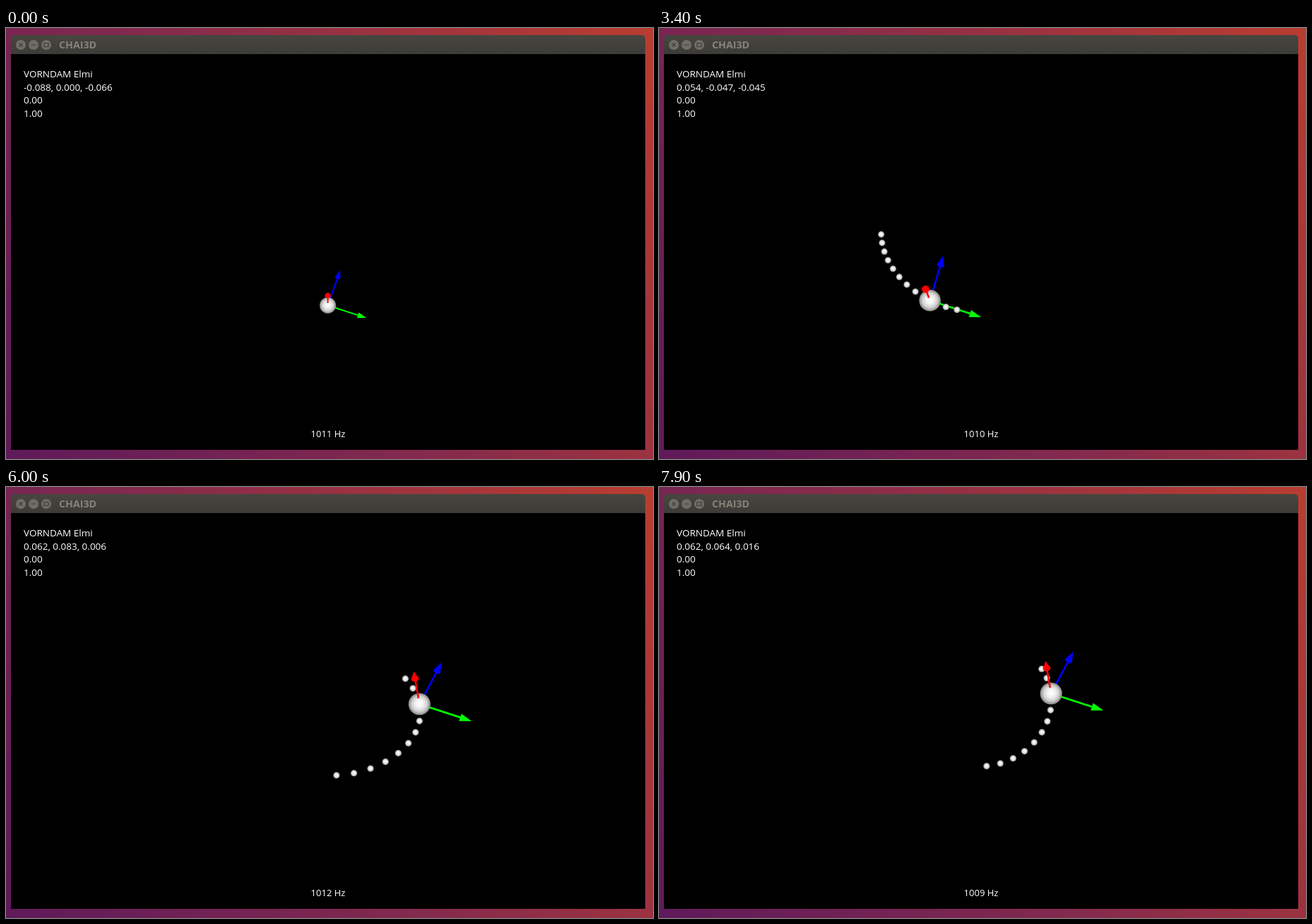
Write an HTML page with a canvas that moves like this. It is 916 by 611 pixels and loops after 8000 ms.

```html
<!DOCTYPE html>
<html lang="en">
<head>
<meta charset="utf-8">
<title>CHAI3D</title>
<style>
  html, body { margin: 0; width: 100%; height: 100%; overflow: hidden; background: #000; }
  canvas { display: block; }
</style>
</head>
<body>
<canvas id="stage" width="916" height="611"></canvas>
<script>
const ctx = document.getElementById('stage').getContext('2d');
const LOOP = 8000, FRAME = 100;
const CENTER = { x: 455.5, y: 317.3 };
const REST = { x: 455.6, y: 393.2, depth: -0.088 };
const RISE_START = 1100, RISE_END = 2350, ORBIT_START = 2250;
const SPHERE_RADIUS = 0.01, DOT_RADIUS = 0.003, AXIS_LENGTH = 0.0485;
const TRAIL_COUNT = 12, TRAIL_STEP = 50, TRAIL_LEAD = 125;
const RATES = [1011, 1013, 1010, 1010, 1008, 1011, 1012, 1009]; // one reading per second

const cos = degrees => Math.cos(degrees * Math.PI / 180);
const sin = degrees => Math.sin(degrees * Math.PI / 180);
const mix = (a, b, u) => a + (b - a) * u;

function smoothstep(from, to, t) {
  const u = Math.min(1, Math.max(0, (t - from) / (to - from)));
  return u * u * (3 - 2 * u);
}

// Anticlockwise loop: slower at first, then one lap per 1.9 s, with a slowly swaying reach
function orbit(t) {
  const angle = (t - 4085) * 360 / 1900 + Math.max(0, 3700 - t) * 0.057;
  const sway = cos((t - 2700) * 360 / 3300);
  return {
    x: 447 + (1.07 + 0.14 * sway) * (112 * cos(angle - 3.4) + 9 * cos(2 * angle + 69)),
    y: 296 + 8 * sway - 97.6 * sin(angle - 11.3) - 10.6 * cos(2 * angle),
    depth: 0.0565 + 0.0055 * cos(angle)
  };
}

// The hand rests, rises, then circles
function handAt(t) {
  const rise = smoothstep(RISE_START, RISE_END, t);
  const goal = orbit(Math.max(t, ORBIT_START));
  const depth = mix(REST.depth, goal.depth, rise ** 0.7);
  return {
    x: mix(REST.x, goal.x, rise ** 3),
    y: mix(REST.y, goal.y, rise),
    depth, rise,
    scale: 660 / (0.486 - depth)
  };
}

function disc(x, y, r, fill) {
  ctx.fillStyle = fill;
  ctx.beginPath();
  ctx.arc(x, y, r, 0, 2 * Math.PI);
  ctx.fill();
}

function ball({ x, y, scale }, size) {
  const r = size * scale;
  const shade = ctx.createRadialGradient(x, y - r * 0.08, 0, x, y, r);
  shade.addColorStop(0, '#fff');
  shade.addColorStop(0.35, '#f3f3f3');
  shade.addColorStop(0.7, '#cfcfcf');
  shade.addColorStop(1, '#858585');
  disc(x, y, r, shade);
}

function arrow({ x, y, scale }, dx, dy, color, start = 0) {
  const length = Math.hypot(dx, dy), half = 0.0035 * scale, base = length * 0.78;
  const tilt = Math.sqrt(Math.max(0, 1 - (length / (AXIS_LENGTH * scale)) ** 2));
  ctx.save();
  ctx.translate(x, y);
  ctx.rotate(Math.atan2(dy, dx));
  ctx.strokeStyle = ctx.fillStyle = color;
  ctx.lineWidth = 0.0017 * scale;
  ctx.beginPath();
  ctx.moveTo(length * start, 0);
  ctx.lineTo(base, 0);
  ctx.stroke();
  ctx.beginPath();
  ctx.moveTo(length, 0);
  ctx.lineTo(base, half);
  ctx.lineTo(base, -half);
  ctx.fill();
  ctx.beginPath();
  ctx.ellipse(base, 0, half * tilt, half, 0, 0, 2 * Math.PI);
  ctx.fill();
  ctx.restore();
}

function text(string, x, y, { font = '13.5px', color = '#fff', align = 'left' } = {}) {
  ctx.font = `${font} "Open Sans", sans-serif`;
  ctx.fillStyle = color;
  ctx.textAlign = align;
  ctx.fillText(string, x, y);
}

function drawWindow() {
  const desktop = ctx.createLinearGradient(0, 611, 916, 0);
  desktop.addColorStop(0, '#5f1a5a');
  desktop.addColorStop(0.45, '#842a4d');
  desktop.addColorStop(1, '#b93d30');
  ctx.fillStyle = desktop;
  ctx.fillRect(0, 0, 916, 611);

  const bar = ctx.createLinearGradient(0, 10, 0, 37);
  bar.addColorStop(0, '#484640');
  bar.addColorStop(1, '#3c3b37');
  ctx.fillStyle = bar;
  ctx.beginPath();
  ctx.roundRect(7, 10, 898, 588, [5, 5, 0, 0]);
  ctx.fill();
  ctx.fillStyle = '#000';
  ctx.fillRect(7, 37, 898, 561);

  for (const x of [21, 39, 57]) disc(x, 24, 7, '#6f6d66');
  ctx.strokeStyle = '#3c3b37';
  ctx.lineWidth = 1.2;
  ctx.beginPath();
  ctx.moveTo(18.5, 21.5); ctx.lineTo(23.5, 26.5);
  ctx.moveTo(23.5, 21.5); ctx.lineTo(18.5, 26.5);
  ctx.moveTo(35.5, 24); ctx.lineTo(42.5, 24);
  ctx.rect(54, 21.5, 6, 5);
  ctx.stroke();
  text('CHAI3D', 75, 29, { font: 'bold 14.2px', color: '#858279' });
}

function drawScene(t) {
  const hand = handAt(t), { scale } = hand;
  const drop = Math.max(0, hand.y - CENTER.y); // a lowered hand tilts the axes
  const trail = Array.from({ length: TRAIL_COUNT },
    (_, k) => handAt(t + TRAIL_LEAD - k * TRAIL_STEP)).sort((a, b) => a.depth - b.depth);
  const inFront = dot => {
    const offset = Math.hypot(dot.x - hand.x, dot.y - hand.y) / scale;
    return dot.depth - hand.depth > Math.sqrt(Math.max(0, SPHERE_RADIUS ** 2 - offset ** 2));
  };

  for (const dot of trail) if (!inFront(dot)) ball(dot, DOT_RADIUS);
  arrow(hand, 31.5 - 0.18 * drop, -0.038 * scale - 0.08 * drop, '#00f');
  arrow(hand, 0.0475 * scale, 0.0155 * scale, '#0f0');
  ball(hand, SPHERE_RADIUS);
  for (const dot of trail) if (inFront(dot)) ball(dot, DOT_RADIUS);
  arrow(hand, -8 * hand.rise ** 3, -46 + 0.37 * drop, '#f00', 0.18);

  const position = [
    hand.depth, (hand.x - CENTER.x) / scale, (CENTER.y - hand.y) / scale
  ].map(v => v.toFixed(3)).join(', ');
  ['VORNDAM Elmi', position, '0.00', '1.00']
    .forEach((line, i) => text(line, 25, 70 + i * 18.7));
  text(`${RATES[Math.floor(t / 1000)]} Hz`, 456, 580, { font: '13px', align: 'center' });
}

const begin = performance.now();
function render() {
  const elapsed = Math.max(0, performance.now() - begin) % LOOP;
  drawWindow();
  drawScene(Math.floor(elapsed / FRAME) * FRAME);
  requestAnimationFrame(render);
}
render();
</script>
</body>
</html>
```
